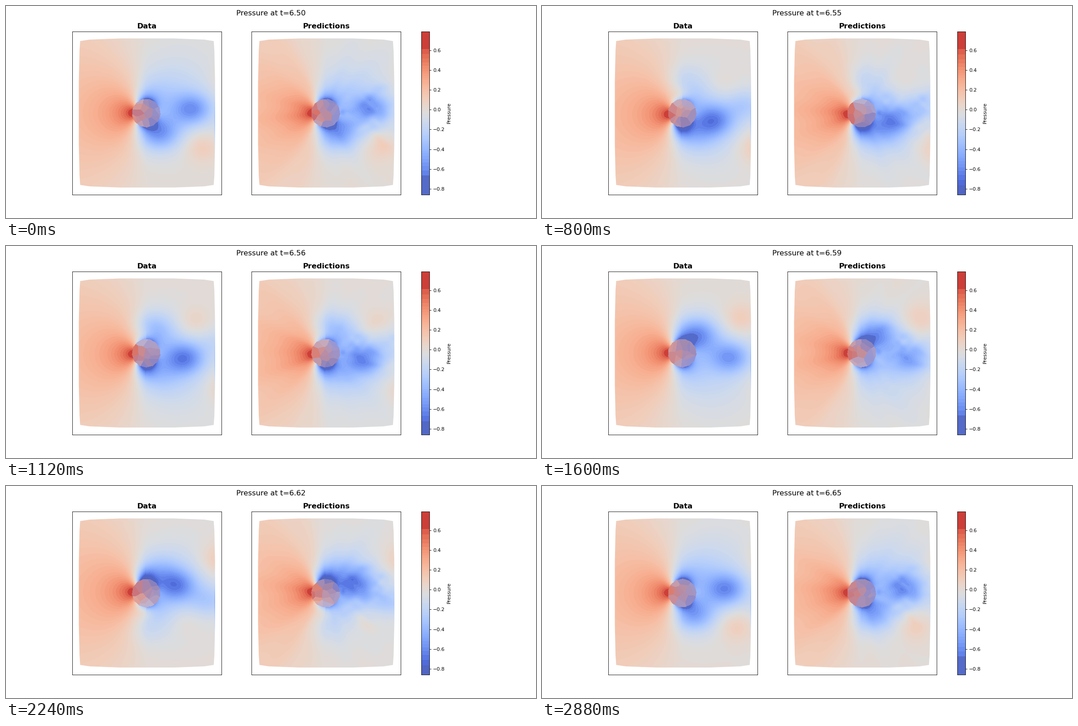
Animation, 1183 px wide and 473 px high, one loop 3040 ms. Source, as a matplotlib script:

```python
import numpy as np
import matplotlib.pyplot as plt
from matplotlib.animation import FuncAnimation
from matplotlib.patches import Polygon

W, H, DPI = 1183, 473, 80
FRAMES, STEP = 19, 160
VMIN, VMAX = -0.859, 0.79
CX, CY, R = 313, 239, 31
PERIOD, SPEED = 18.6, 7.9
CMAP = plt.get_cmap("coolwarm")

plt.rcParams["font.family"] = "DejaVu Sans"

# One quarter of the domain edge, mirrored to all four corners
QUARTER = np.array([(152, 70), (150.5, 139), (149, 160.5), (128, 163.7), (60, 166.3)])
OUTLINE = np.concatenate([QUARTER[::sx * sy] * (sx, sy) + (314.6, 238.7)
                          for sx, sy in [(1, 1), (-1, 1), (-1, -1), (1, -1)]])
X0, X1, Y0, Y1 = 162, 468, 72, 406
X, Y = np.meshgrid(np.arange(X0, X1) + 0.5, np.arange(Y0, Y1) + 0.5)
DIST = np.hypot(X - CX, Y - CY)
THETA = np.arctan2(Y - CY, X - CX)

rng = np.random.default_rng(4)
BLOBS = np.column_stack([rng.uniform(0, 146, 44), rng.normal(CY, 30, 44),
                         rng.uniform(4, 8, 44), rng.uniform(9, 18, 44),
                         rng.uniform(-0.9, 0.9, 44), rng.uniform(-0.08, 0.07, 44)])


def gauss(x, y, sx, sy):
    return np.exp(-((X - x) / sx) ** 2 / 2 - ((Y - y) / sy) ** 2 / 2)


def wave(n, peak):
    return np.cos(2 * np.pi * (n - peak) / PERIOD)


def upstream(n):
    """Stagnation pressure in front and suction at the shoulders."""
    dy = Y - CY - 3 * wave(n, 5) * (X < CX)
    d = np.maximum(np.hypot(X - CX, dy), 26)
    c, s2 = (CX - X) / d, (dy / d) ** 2
    near = (R / d) ** 2
    c = np.where(c > 0, c * (1 - 0.8 * s2 * near), 0.15 * c)
    return 0.65 * (38 / d) ** 0.75 * (c - 0.82 * s2 * near)


def vortices(n):
    """Alternating low-pressure cores with a high-pressure spot across the wake."""
    p = np.zeros_like(X)
    for k in range(-3, 4):
        side = 1 if k % 2 == 0 else -1
        x = 383 + SPEED * (n - 5 - k * PERIOD / 2)
        amp = 0.45 * np.exp(-((x - 397) / 45) ** 2 / 2)
        p -= amp * gauss(x, CY + side * (9 + 0.006 * (x - 418) ** 2), 30, 24)
        spot = x + 19
        amp = 0.16 * np.clip((spot - 355) / 75, 0, 1)
        off = min(58 + 0.3 * (spot - 385), 76)
        p += amp * gauss(spot, CY - side * off, 29, 26)
    return p


def wake(n):
    ramp = np.clip((X - 265) / 65, 0, 1)
    ramp = ramp * ramp * (3 - 2 * ramp)
    p = -0.2 * ramp * gauss(368, CY, 60, 66)
    p += 0.06 * wave(n, -1) * np.tanh((Y - CY) / 60) * gauss(390, CY, 64, 110)
    for side in (-1, 1):
        p -= 0.24 * side * wave(n, 5) * gauss(312, CY + side * 34, 15, 17)
        p -= 0.09 * (1 + side * wave(n, 3)) * gauss(342, CY + side * 50, 32, 26)
    return p + vortices(n)


def ripples(n):
    """Patchy texture carried along by the flow."""
    p = -0.12 * gauss(350, 237, 5, 5)
    for x, y, a, b, tilt, amp in BLOBS:
        u = (x + n * 146 / FRAMES) % 146
        dx, dy = X - 336 - u, Y - y
        c, s = np.cos(tilt), np.sin(tilt)
        p += amp * np.sin(np.pi * u / 146) * np.exp(
            -((c * dx + s * dy) / b) ** 2 / 2 - ((c * dy - s * dx) / a) ** 2 / 2)
    rays = np.sin(11 * THETA + 2 * n) + np.sin(17 * THETA - 3 * n)
    return p + 0.006 * rays * np.clip(DIST / 60, 0, 1)


def pressure(n, predicted):
    if predicted:
        p = upstream(n) + 0.93 * wake(n) + ripples(n)
    else:
        m = n % (PERIOD / 2)
        p = upstream(n) + wake(n) + 0.04 * np.exp(-(m - 3) ** 2 / 2)
    return p - 0.2 * (X > 465) * np.exp(-((Y - 265) / 50) ** 2)


def paint(v, n):
    """Colour bands that are fine near zero and widen towards both ends."""
    lo, hi = -0.715 - 0.05 * wave(2 * n, 10), 0.61
    u = np.linspace(-1, 1, 60)
    edges = (lo + hi) / 2 + (hi - lo) / 2 * (0.75 * u + 0.25 * u ** 7)
    full = np.concatenate([[VMIN], edges, [VMAX]])
    centre = (full[1:] + full[:-1]) / 2
    centre[-1] = hi + 0.07
    rgb = CMAP((centre - VMIN) / (VMAX - VMIN))[:, :3]
    rgb[0] = (rgb[0] + np.array([95, 115, 190]) / 255) / 2
    return rgb[np.searchsorted(edges, v)]


def add_cylinder(img, n, predicted):
    """Faceted disc whose cells blend the colours found around its rim."""
    r = np.random.default_rng(100 + n * 2 + predicted)
    sector = 2 * np.pi / 13
    ang = (THETA + r.uniform(0, sector)) % sector - sector / 2
    disc = DIST < 32 * np.cos(sector / 2) / np.cos(ang)

    a = np.linspace(0, 2 * np.pi, 28, endpoint=False)
    rx, ry = CX + 33 * np.cos(a), CY + 33 * np.sin(a)
    rim = img[(ry - Y0).astype(int), (rx - X0).astype(int)]

    rad, phi = 30 * np.sqrt(r.uniform(0, 1, 17)), r.uniform(0, 2 * np.pi, 17)
    sx, sy = CX + rad * np.cos(phi), CY + rad * np.sin(phi)
    w = np.exp(-1.2 * np.cos(a)) / (
        (sx[:, None] - rx) ** 2 + (sy[:, None] - ry) ** 2 + 120)
    cells = w @ rim / w.sum(1, keepdims=True)
    cells += r.uniform(-0.04, 0.04, (17, 1)) * np.array([1, 0.3, -0.8])

    px, py = X[disc], Y[disc]
    near = np.argmin((px[:, None] - sx) ** 2 + (py[:, None] - sy) ** 2, axis=1)
    img[disc] = np.clip(cells, 0, 1)[near]


def render(n, predicted):
    img = paint(pressure(n, predicted), n)
    add_cylinder(img, n, predicted)
    return img


fig = plt.figure(figsize=(W / DPI, H / DPI), dpi=DPI, facecolor="white")

# Two panels share 80% of the plot area, the colour bar sits at 85%
LEFT, BOTTOM, WIDTH, HEIGHT = 0.125, 0.11, 0.775, 0.77
PANEL = 0.8 * WIDTH / 2.2
BAR = HEIGHT * H / 20 / W


def panel(x, name):
    ax = fig.add_axes([x, BOTTOM, PANEL, HEIGHT])
    im = ax.imshow(np.ones((Y1 - Y0, X1 - X0, 3)), extent=(X0, X1, Y1, Y0),
                   aspect="auto", interpolation="nearest")
    left = LEFT * W
    ax.set(xlim=(left, left + PANEL * W), xticks=[], yticks=[],
           ylim=((1 - BOTTOM) * H, (1 - BOTTOM - HEIGHT) * H))
    im.set_clip_path(Polygon(OUTLINE, transform=ax.transData))
    ax.set_title(name, fontsize=14.8, fontweight="bold")
    return im


images = [panel(LEFT, "Data"), panel(LEFT + 1.2 * PANEL, "Predictions")]

bar_ax = fig.add_axes([LEFT + 0.85 * WIDTH, BOTTOM, BAR, HEIGHT])
SCALE = np.linspace(VMIN, VMAX, 729)[:, None]
bar = bar_ax.imshow(np.ones((729, 1, 3)), extent=(0, 1, VMIN, VMAX), origin="lower",
                    aspect="auto", interpolation="nearest")
bar_ax.set(xticks=[], yticks=np.arange(-4, 4) / 5, ylim=(VMIN, VMAX))
bar_ax.yaxis.tick_right()
bar_ax.yaxis.set_label_position("right")
bar_ax.yaxis.set_major_formatter("{x:.1f}")
bar_ax.tick_params(labelsize=9.86)
bar_ax.set_ylabel("Pressure", fontsize=9.86)
title = fig.suptitle("", fontsize=14.8)


def update(n):
    for predicted, im in enumerate(images):
        im.set_data(render(n, predicted))
    bar.set_data(paint(SCALE, n))
    title.set_text(f"Pressure at t={6.504 + n / 120:.2f}")
    return [*images, bar, title]


anim = FuncAnimation(fig, update, frames=FRAMES, interval=STEP,
                     repeat=True, repeat_delay=0, blit=False)
plt.show()
```
